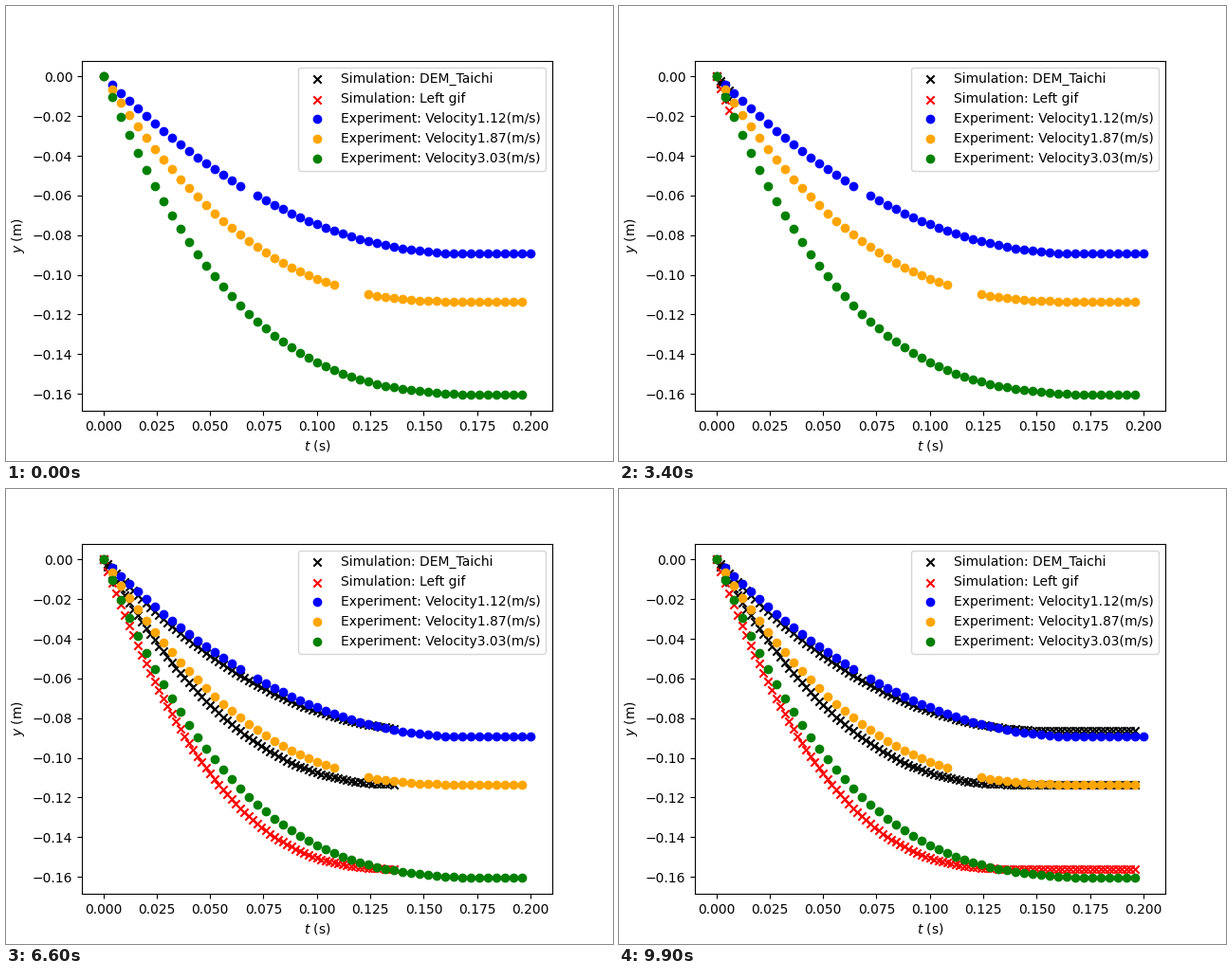
Animation of 640 by 480 pixels, one loop 10000 ms. Source, as a matplotlib script:

```python
import numpy as np
import matplotlib.pyplot as plt
from matplotlib.animation import FuncAnimation

STEPS = 100
SIM_DT = 0.002
CAMERA_DT = 0.2002 / 50


def fall(t, depth, stop, power):
    """Height of a body that slows down and rests at -depth from time stop on."""
    left = np.clip(1 - t / stop, 0, 1)
    return -depth * (1 - left ** power)


def shots(count, gap=()):
    """Times of the camera shots, without the lost ones."""
    return np.array([i for i in range(count) if i not in gap]) * CAMERA_DT


t_sim = np.arange(STEPS) * SIM_DT
slow = fall(t_sim, 0.0865, 0.160, 2.20)
medium = fall(t_sim, 0.1134, 0.140, 2.36)
fast = fall(t_sim, 0.1560, 0.140, 2.67)

fig, ax = plt.subplots(figsize=(6.4, 4.8), dpi=100)
black_marks = ax.scatter([], [], marker="x", color="black", label="Simulation: DEM_Taichi")
red_marks = ax.scatter([], [], marker="x", color="red", label="Simulation: Left gif")

experiments = [
    ("blue", 1.12, shots(51, gap=[17]), (0.0893, 0.170, 2.03)),
    ("orange", 1.87, shots(50, gap=[28, 29, 30]), (0.1134, 0.165, 2.47)),
    ("green", 3.03, shots(50), (0.16065, 0.200, 3.28)),
]
for color, speed, t, motion in experiments:
    ax.scatter(t, fall(t, *motion), color=color, label=f"Experiment: Velocity{speed}(m/s)")

ax.set_xlim(-0.01001, 0.21021)
ax.set_ylim(-0.16868, 0.00803)
ax.set_xlabel("$t$ (s)")
ax.set_ylabel("$y$ (m)")
ax.legend(loc="upper right")

# Steps play in text order: 0, 1, 10, 11, ..., 19, 2, 20, ...
order = sorted(range(STEPS), key=str)


def update(frame):
    n = order[frame]
    t = t_sim[:n]
    black_marks.set_offsets(np.column_stack([np.r_[t, t], np.r_[slow[:n], medium[:n]]]))
    red_marks.set_offsets(np.column_stack([t, fast[:n]]))
    return black_marks, red_marks


anim = FuncAnimation(fig, update, frames=STEPS, interval=100, repeat=True, repeat_delay=0)
plt.show()
```
